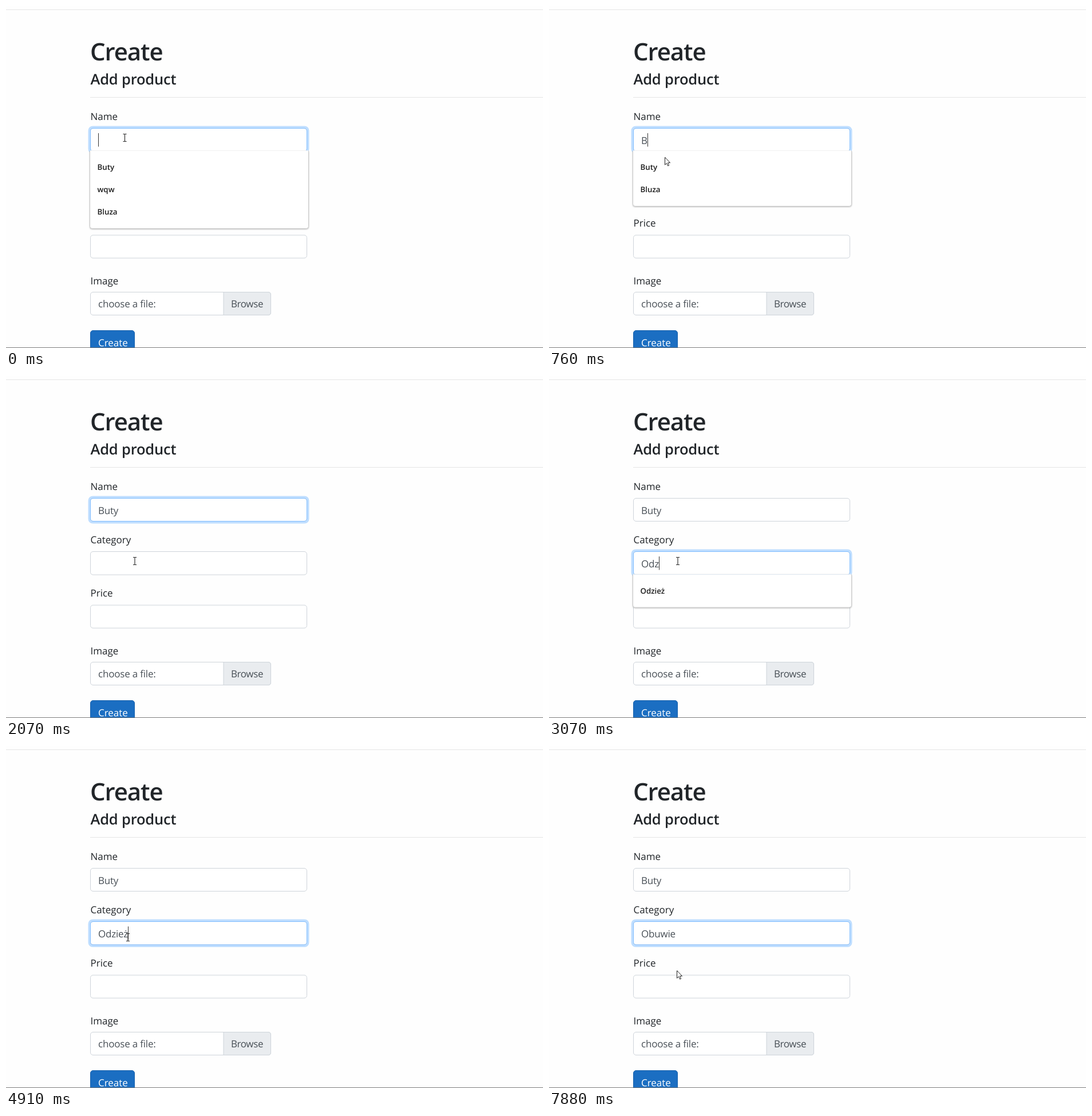
An HTML page that plays this animation: 938 px wide and 597 px high, repeating every 8 s.

```html
<!DOCTYPE html>
<html lang="en">
<head>
<meta charset="utf-8">
<title>Add product</title>
<style>
  html, body { margin: 0; width: 100%; height: 100%; overflow: hidden; background: #fefefe; }
  svg { display: block; width: 100vw; height: 100vh; }
  text { font: 17px "Open Sans", "Noto Sans", sans-serif; fill: #212529; white-space: pre; text-rendering: geometricPrecision; }
  .h1 { font-size: 42px; font-weight: 600; letter-spacing: -1.1px; }
  .h2 { font-size: 25.5px; font-weight: 600; letter-spacing: -.2px; }
  .item { font-size: 13.3px; font-weight: 600; fill: #1c1c1c; }
  .value { fill: #495057; letter-spacing: -.2px; }
  .tight { letter-spacing: -.4px; }
  .field { fill: #fff; stroke: #ced4da; }
  .ring { fill: none; stroke: #bfdeff; stroke-width: 4; }
  .focus { fill: none; stroke: #80bdff; }
  .popup { fill: #fff; stroke: #c9c9c9; filter: drop-shadow(0 1px 1px rgba(0, 0, 0, .25)); }
</style>
</head>
<body>
<svg id="stage" viewBox="0 0 938 597"></svg>
<script>
const stage = document.getElementById('stage');
const LOOP = 8000, ROW = 39;

function add(tag, attrs = {}, text, parent = stage) {
  const el = document.createElementNS('http://www.w3.org/2000/svg', tag);
  set(el, attrs);
  if (text) el.textContent = text;
  return parent.appendChild(el);
}
function set(el, attrs) {
  for (const k in attrs) el.setAttribute(k, attrs[k]);
}
function show(el, on) {
  el.setAttribute('visibility', on ? 'visible' : 'hidden');
}
const rect = (x, y, width, height, more) => add('rect', { x, y, width, height, ...more });
const label = (x, y, text, cls = '') => add('text', { x, y, class: cls }, text);

function field(y, height) {
  const box = { rx: 4.5 };
  const back = rect(147.5, y, 378, height, { ...box, class: 'field' });
  const focus = add('g');
  const frame = { x: 147.5, y, width: 378, height, rx: 4.5, class: 'focus' };
  add('rect', { x: 145.5, y: y - 2, width: 382, height: height + 4, rx: 6, class: 'ring' }, '', focus);
  add('rect', frame, '', focus);
  const mark = rect(161, y + 8, 0, 23.5, { fill: '#3390ff' });
  const value = label(161, y + 27.5, '', 'value');
  const plain = add('tspan', {}, '', value);
  const picked = add('tspan', { fill: '#fff' }, '', value);
  const caret = rect(161, y + 8.5, 1, 23.5, { fill: '#333' });
  return { back, focus, mark, value, plain, picked, caret };
}

function drawField(f, text, level, caretOn, from, preview) {
  f.back.style.fill = preview ? '#e8f0fe' : '';
  f.focus.setAttribute('opacity', level);
  f.plain.textContent = text.slice(0, from);
  f.picked.textContent = text.slice(from);
  const end = text ? f.value.getComputedTextLength() : 0;
  const start = from < text.length ? f.value.getSubStringLength(0, from) : end;
  set(f.mark, { x: 161 + start, width: Math.max(0, end - start) });
  f.caret.setAttribute('x', Math.round(161 + end));
  show(f.caret, caretOn);
}

// Page
rect(0, 6, 938, 1, { fill: '#e6e6e6' });
label(147, 94.5, 'Create', 'h1');
label(147.5, 137, 'Add product', 'h2');
rect(147, 159, 791, 1, { fill: '#e5e5e5' });
label(147.5, 198.5, 'Name');
label(147.5, 291.5, 'Category');
label(147.5, 385, 'Price');
label(147.5, 485.5, 'Image');
const nameField = field(213.5, 40);
const catField = field(306.5, 40.5);
rect(147.5, 400, 378, 40, { rx: 4.5, class: 'field' });
rect(147.5, 499.5, 315, 40, { rx: 4.5, class: 'field' });
add('path', { d: 'M380 499.5H458q4.5 0 4.5 4.5V535q0 4.5 -4.5 4.5H380Z', fill: '#e9ecef', stroke: '#ced4da' });
label(161, 526, 'choose a file:', 'value');
label(393, 526, 'Browse', 'value tight');
rect(147.5, 566.5, 77, 41, { rx: 4.5, fill: '#1b6ec2', stroke: '#1861ac' });
label(161, 593.5, 'Create').style.fill = '#fff';

// Suggestion list
const popup = add('g');
const panel = add('path', { class: 'popup' }, '', popup);
const edge = add('rect', { x: 147, width: 381, height: 1, fill: '#f0f0f0' }, '', popup);
const hover = add('rect', { x: 147, width: 381, height: ROW, fill: '#ececec' }, '', popup);
const rows = [0, 1, 2].map(() => add('text', { x: 159.5, class: 'item' }, '', popup));

rect(0, 596, 938, 1, { fill: '#7a7a7a' });

// Pointers
const beam = add('path', { d: 'M-3 -6.5H-1L0 -6L1 -6.5H3M0 -6V6M-3 6.5H-1L0 6L1 6.5H3', fill: 'none', stroke: '#222', 'stroke-width': 1.1 });
const arrow = add('path', { d: 'M.5 .5V13.8L3.5 11L5.6 15.6L7.6 14.7L5.6 10.2H9.6Z', fill: '#fff', stroke: '#222', 'stroke-linejoin': 'round' });

function drawPopup(items, top, hovered) {
  show(popup, items.length);
  if (!items.length) return;
  const bottom = top + items.length * ROW + 18.5;
  panel.setAttribute('d', `M146.5 ${top}V${bottom - 4}q0 4 4 4H524.5q4 0 4 -4V${top}`);
  edge.setAttribute('y', top - 1);
  hover.setAttribute('y', top + 9);
  hover.setAttribute('opacity', hovered ? 1 : 0);
  rows.forEach((row, i) => {
    row.textContent = items[i] || '';
    row.setAttribute('y', top + 33 + i * ROW);
  });
}

const ibeam = (x, y) => ({ pointer: 'beam', x, y });
const point = (x, y) => ({ pointer: 'arrow', x, y });
const type = (key, text, items) => ({ [key]: text, caret: 1, ...(items && { items }) });

// Each step changes part of the state; level moves the focus from name (0) to category (1).
const steps = [
  [0, { name: '', cat: '', level: 0, caret: 1, from: 99, hovered: 0, items: ['Buty', 'wqw', 'Bluza'], ...ibeam(207.5, 230) }],
  [120, ibeam(206.5, 243)],
  [240, { ...point(203, 260), name: 'Buty', caret: 0, hovered: 1 }],
  [360, point(202, 263.5)],
  [760, { ...type('name', 'B', ['Buty', 'Bluza']), hovered: 0 }],
  [1010, type('name', 'Bu', ['Buty'])],
  [1130, type('name', 'But')],
  [1390, type('name', 'Buty', [])],
  [1950, { caret: 0, ...point(213, 288) }],
  [2070, ibeam(225, 323)],
  [2220, { level: .6, caret: 1 }],
  [2340, { level: 1, items: ['Odzież'] }],
  [2800, { caret: 0 }],
  [2950, type('cat', 'Od')],
  [3070, type('cat', 'Odz')],
  [3350, type('cat', 'Odzi')],
  [3470, type('cat', 'Odzie')],
  [3840, { ...type('cat', 'Odzież', []), pointer: '' }],
  [4240, ibeam(225, 323)],
  [4380, { caret: 0, ...ibeam(224.5, 329) }],
  [4520, ibeam(213, 334)],
  [4910, { caret: 1 }],
  [5030, ibeam(243, 332)],
  [5150, ibeam(270, 328)],
  [5400, ibeam(246, 328)],
  [5520, { caret: 0, from: 5, ...ibeam(207, 328) }],
  [5640, { from: 3, ...ibeam(192, 328) }],
  [5760, { from: 2, ...ibeam(179.5, 328) }],
  [5910, { from: 1, ...ibeam(175.5, 328) }],
  [6060, ibeam(226, 314)],
  [6190, point(283.5, 287)],
  [6580, { ...type('cat', 'Ob'), from: 99 }],
  [6700, type('cat', 'Obu')],
  [6960, type('cat', 'Obuw')],
  [7080, type('cat', 'Obuwi')],
  [7200, type('cat', 'Obuwie')],
  [7760, { caret: 0, ...point(206, 358) }],
  [7880, point(223, 391.5)]
];

function draw(t) {
  const s = Object.assign({}, ...steps.filter(([at]) => at <= t).map(([, change]) => change));
  const onName = s.level === 0;
  drawField(nameField, s.name, 1 - s.level, onName && s.caret, 99, s.hovered);
  drawField(catField, s.cat, s.level, !onName && s.caret, s.from, 0);
  drawPopup(s.items, onName ? 253 : 346.5, s.hovered);
  show(beam, s.pointer === 'beam');
  show(arrow, s.pointer === 'arrow');
  const place = `translate(${s.x} ${s.y})`;
  beam.setAttribute('transform', place);
  arrow.setAttribute('transform', place);
}

function tick() {
  draw(performance.now() % LOOP);
  requestAnimationFrame(tick);
}
tick();
</script>
</body>
</html>
```
